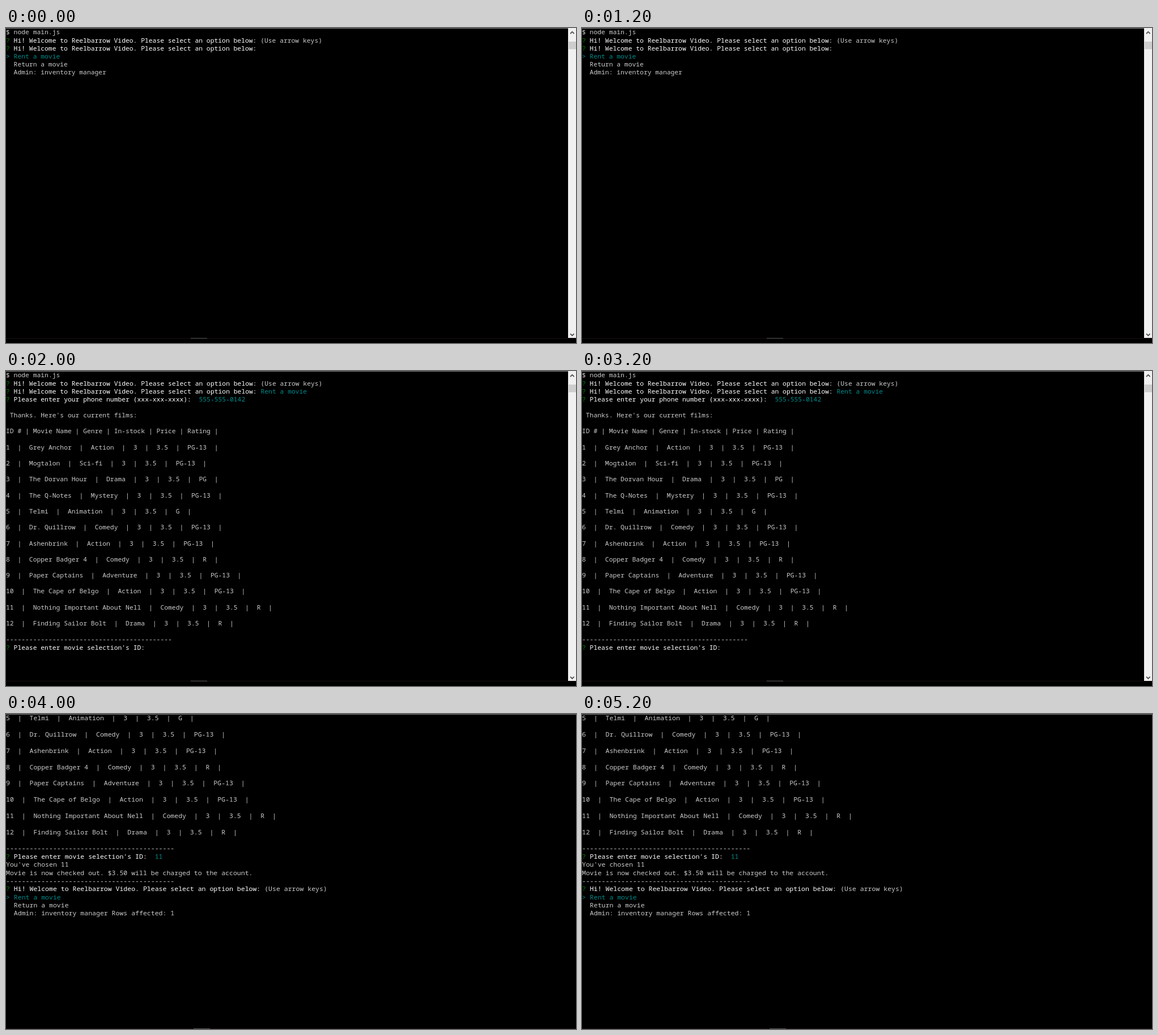
Recreate the animation shown at these times as an HTML page with a canvas. Size 1006x557 px, loop 6000 ms.

```html
<!DOCTYPE html>
<html lang="en">
<head>
<meta charset="utf-8">
<title>Video rental terminal</title>
<style>
  html, body { margin: 0; width: 100%; height: 100%; overflow: hidden; background: #000; }
  canvas { display: block; width: 1006px; height: 557px; }
</style>
</head>
<body>
<canvas id="stage" width="1006" height="557"></canvas>
<script>
const ctx = document.getElementById('stage').getContext('2d');
const W = 1006, H = 557, SCENE_MS = 2000;
const GRAY = '#cccccc', WHITE = '#fff', GREEN = '#008a00', TEAL = '#008c8c';

// A line is a list of [text, colour] pieces.
const plain = text => [[text, GRAY]];
const ask = (question, ...rest) => [['? ', GREEN], [question, WHITE], ...rest];
const BLANK = [];
const RULE = plain('-'.repeat(43));

const WELCOME = 'Hi! Welcome to Reelbarrow Video. Please select an option below: ';
const HINT = ['(Use arrow keys)', GRAY];
const PICK = "Please enter movie selection's ID:  ";

const menu = (tail = '') => [
  [['> Rent a movie', TEAL]],
  plain('  Return a movie'),
  plain('  Admin: inventory manager' + tail)
];

const films = [
  ['Grey Anchor', 'Action', 'PG-13'],
  ['Mogtalon', 'Sci-fi', 'PG-13'],
  ['The Dorvan Hour', 'Drama', 'PG'],
  ['The Q-Notes', 'Mystery', 'PG-13'],
  ['Telmi', 'Animation', 'G'],
  ['Dr. Quillrow', 'Comedy', 'PG-13'],
  ['Ashenbrink', 'Action', 'PG-13'],
  ['Copper Badger 4', 'Comedy', 'R'],
  ['Paper Captains', 'Adventure', 'PG-13'],
  ['The Cape of Belgo', 'Action', 'PG-13'],
  ['Nothing Important About Nell', 'Comedy', 'R'],
  ['Finding Sailor Bolt', 'Drama', 'R']
];
const filmLines = films.flatMap(([name, genre, rating], i) =>
  [plain([i + 1, name, genre, 3, 3.5, rating, ''].join('  |  ')), BLANK]);

const start = [plain('$ node main.js'), ask(WELCOME, HINT)];

const scenes = [
  {
    cell: 6.805, pitch: 14.15, edge: 548.3, tab: 326, bar: true,
    lines: [...start, ask(WELCOME), ...menu()]
  },
  {
    cell: 6.81, pitch: 14.15, edge: 547.7, tab: 326, bar: true,
    lines: [
      ...start,
      ask(WELCOME, ['Rent a movie', TEAL]),
      ask('Please enter your phone number (xxx-xxx-xxxx):  ', ['555-555-0142', TEAL]),
      BLANK,
      plain(" Thanks. Here's our current films:"),
      BLANK,
      plain('ID # | Movie Name | Genre | In-stock | Price | Rating |'),
      BLANK,
      ...filmLines,
      RULE,
      ask(PICK)
    ]
  },
  {
    cell: 6.912, pitch: 14.375, edge: 556, tab: 331, bar: false,
    lines: [
      ...filmLines.slice(8),
      RULE,
      ask(PICK, ['11', TEAL]),
      plain("You've chosen 11"),
      plain('Movie is now checked out. $3.50 will be charged to the account.'),
      RULE,
      ask(WELCOME, HINT),
      ...menu(' Rows affected: 1')
    ]
  }
];

function rect(x, y, w, h, color) {
  ctx.fillStyle = color;
  ctx.fillRect(x, y, w, h);
}

function drawText({ lines, cell, pitch }) {
  const scale = cell / 12; // a 20px glyph advances 12 units
  ctx.font = '20px "Noto Sans Mono", "DejaVu Sans Mono", monospace';
  ctx.textBaseline = 'alphabetic';
  lines.forEach((line, row) => {
    ctx.setTransform(scale, 0, 0, scale, 0, 11.4 + row * pitch);
    let col = 0;
    for (const [text, color] of line) {
      ctx.fillStyle = color;
      ctx.fillText(text, col * 12, 0);
      col += text.length;
    }
  });
  ctx.setTransform(1, 0, 0, 1, 0, 0);
}

function chevron(y, dir) {
  ctx.beginPath();
  ctx.moveTo(996, y + 1.7 * dir);
  ctx.lineTo(999.3, y - 1.6 * dir);
  ctx.lineTo(1002.6, y + 1.7 * dir);
  ctx.strokeStyle = '#505050';
  ctx.lineWidth = 1.8;
  ctx.stroke();
}

function drawScrollbar() {
  rect(992, 0, 14, 548, '#f0f0f0');
  rect(993, 24, 13, 13.5, '#cdcdcd');
  chevron(8.3, 1);
  chevron(542.4, -1);
}

function draw(scene) {
  rect(0, 0, W, H, '#000');
  rect(0, 0, W, 1, '#808080');
  rect(0, scene.edge, W, 1, '#1c1014');
  rect(scene.tab, scene.edge, 29, 1, '#5c5c5c');
  if (scene.bar) drawScrollbar();
  drawText(scene);
}

const origin = performance.now();
function tick() {
  const t = performance.now() - origin;
  draw(scenes[Math.floor(t / SCENE_MS) % scenes.length]);
  requestAnimationFrame(tick);
}
tick();
</script>
</body>
</html>
```
